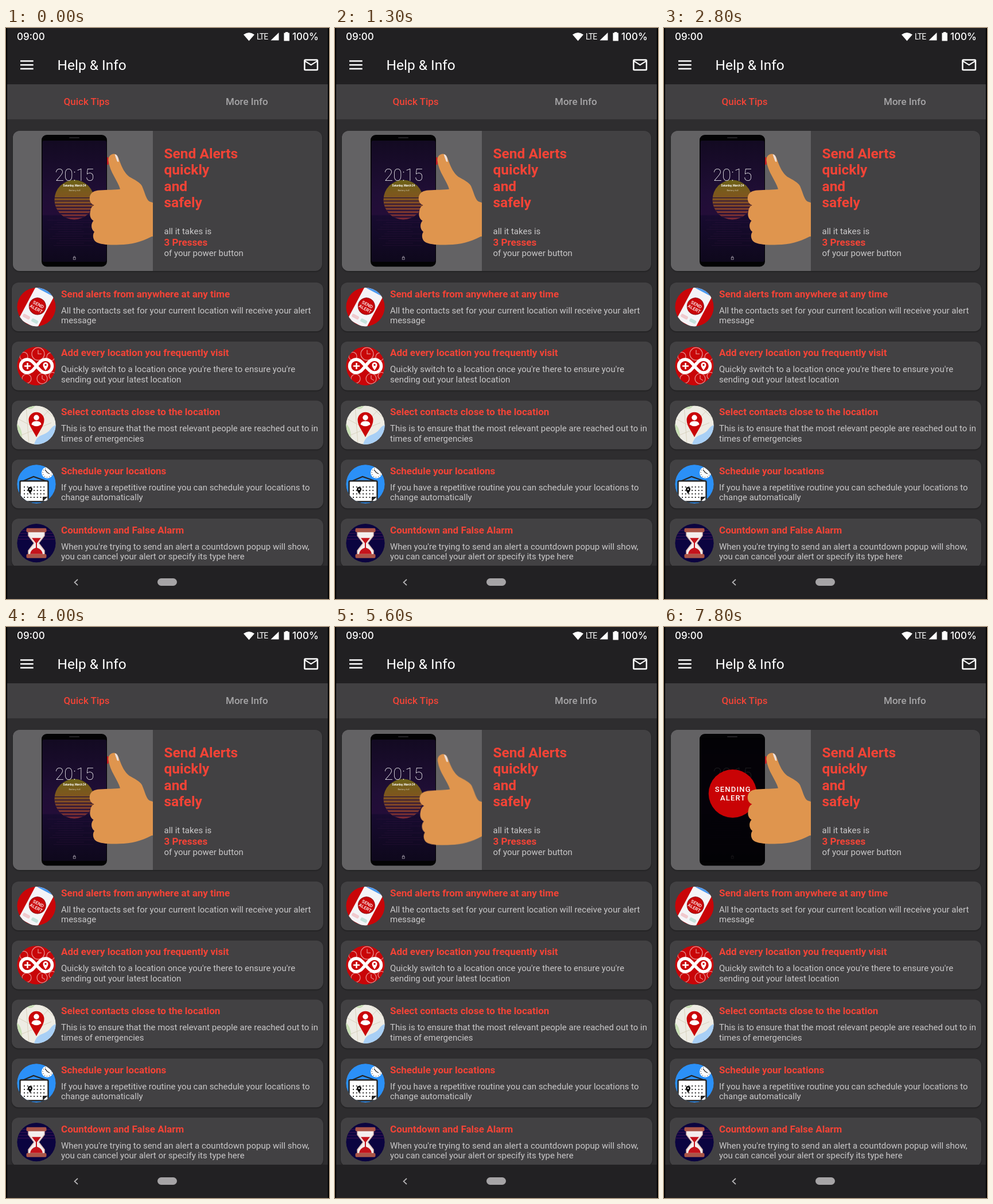
Animation of 563 by 994 pixels, one loop 8 s. Source, as an HTML page:

```html
<!DOCTYPE html>
<html lang="en">
<head>
<meta charset="utf-8">
<title>Help &amp; Info</title>
<style>
  html, body { margin: 0; width: 100%; height: 100%; overflow: hidden; background: #000; }
  svg { display: block; width: 563px; height: 994px; font-family: Roboto, sans-serif; }
  .title { font-size: 24.5px; fill: #fff; }
  .status { font: 500 17px Inter, sans-serif; fill: #fff; }
  .tab { font-size: 17px; font-weight: 500; }
  .lead { font-size: 24.5px; font-weight: 700; }
  .head { font-size: 17px; font-weight: 700; }
  .body { font-size: 15px; fill: #c9c8c9; }
  .red { fill: #f44336; }
  .card { fill: #424143; filter: drop-shadow(0 1.5px 1px #0006); }
  .clock { font-size: 28.8px; font-weight: 100; fill: #fff; }
  .sending { font-size: 13px; font-weight: 500; letter-spacing: 1.2px; fill: #fff; }
  .mid { text-anchor: middle; }

  .hand, .button, .alert { animation: 8s linear infinite; }
  .hand { animation-name: press; transform-origin: 256px 290px; }
  .button { animation-name: button; }
  .alert { animation-name: alert; opacity: 0; }
  @keyframes press {
    0%, 60% { transform: none; }
    62.5%, 85% { transform: translate(1.5px, 1px) rotate(-1deg); }
    87.5%, 100% { transform: none; }
  }
  @keyframes button {
    0%, 60% { opacity: 1; }
    62%, 85.5% { opacity: 0; }
    87.5%, 100% { opacity: 1; }
  }
  @keyframes alert {
    0%, 88.5% { opacity: 0; }
    92.5%, 100% { opacity: 1; }
  }
</style>
</head>
<body>
<svg viewBox="0 0 563 994">
  <defs>
    <clipPath id="round"><circle r="33.7"/></clipPath>
    <clipPath id="hero"><rect x="12" y="179" width="539" height="244" rx="12"/></clipPath>
    <clipPath id="panel"><rect x="12" y="179" width="244" height="244"/></clipPath>
    <clipPath id="sunClip"><circle cx="119" cy="299" r="34.5"/></clipPath>
    <linearGradient id="night" x2="0" y2="1">
      <stop stop-color="#130a22"/><stop offset=".45" stop-color="#200e36"/>
      <stop offset=".61" stop-color="#230d38"/><stop offset=".62" stop-color="#180b30"/>
      <stop offset="1" stop-color="#0e081c"/>
    </linearGradient>
    <linearGradient id="sun" x2="0" y2="1">
      <stop stop-color="#6c6217"/><stop offset=".45" stop-color="#80551f"/>
      <stop offset="1" stop-color="#7b2836"/>
    </linearGradient>
  </defs>

  <rect x="2" width="559" height="994" fill="#2e2d2f"/>
  <rect x="2" width="559" height="98" fill="#212022"/>
  <rect x="2" y="98" width="559" height="61" fill="#414042"/>

  <!-- Status and app bar -->
  <text class="status" x="19" y="21">09:00</text>
  <text class="status" x="499" y="21">100%</text>
  <text x="437" y="20" font-size="14" letter-spacing="-.9" fill="#fff">LTE</text>
  <g fill="#fff">
    <path d="M414 11.5Q423.5 4.5 433 11.5L423.5 22.5Z"/>
    <path d="M475.5 8V21.5H461.5Z"/>
    <path d="M484.5 8.5H487V7H491.5V8.500H494V22.5H484.5Z"/>
    <path d="M25 56.200h22.700v2.500h-22.700zM25 63h22.700v2.500h-22.700zM25 69.800h22.700v2.500h-22.700z"/>
    <path transform="translate(516.700 49.200) scale(1.25)" fill-rule="evenodd"
      d="M20 4H4Q2 4 2 6V18Q2 20 4 20H20Q22 20 22 18V6Q22 4 20 4ZM20 18H4V8L12 13L20 8ZM20 6L12 11L4 6Z"/>
  </g>
  <text class="title" x="89.500" y="73">Help &amp; Info</text>
  <text class="tab red" x="100.500" y="133.500">Quick Tips</text>
  <text class="tab" x="383" y="133.500" fill="#a5a4a6">More Info</text>

  <!-- Hero card -->
  <rect class="card" x="12" y="179" width="539" height="244" rx="12"/>
  <g clip-path="url(#hero)"><g clip-path="url(#panel)">
    <rect x="12" y="179" width="244" height="244" fill="#636264"/>
    <rect class="button" x="174" y="225" width="5" height="13" rx="1.5" fill="#c4202a"/>
    <rect x="62" y="186" width="114" height="229.500" rx="9" fill="#030304"/>
    <rect x="110" y="190" width="18" height="2" rx="1" fill="#242326"/>
    <rect x="63.500" y="196" width="111.500" height="211" rx="3" fill="url(#night)"/>
    <circle cx="119" cy="299" r="34.500" fill="url(#sun)"/>
    <g id="bands" clip-path="url(#sunClip)" fill="#27113a"></g>
    <g id="waves" fill="#4a1b50" opacity=".2"></g>
    <text class="clock mid" x="119.500" y="265.700">20:15</text>
    <text class="mid" x="119.500" y="276" font-size="4.600" font-weight="700" fill="#fff">Saturday, March 24</text>
    <text class="mid" x="119.500" y="283.500" font-size="4.200" fill="#d0c8b0">Battery full</text>
    <g fill="none" stroke="#aaa4b0" stroke-width=".8">
      <rect x="117.300" y="399.500" width="3.800" height="3.500"/>
      <path d="M118 399.500v-1.500q1.200-1.600 2.400 0v1.500"/>
    </g>
    <g class="alert">
      <rect x="63" y="193" width="112.500" height="216" rx="3" fill="#020203" opacity=".87"/>
      <circle cx="119.700" cy="290" r="42" fill="#c90305"/>
      <text class="sending mid" x="120.300" y="287">SENDING</text>
      <text class="sending mid" x="120.300" y="302">ALERT</text>
    </g>
    <g class="hand">
      <path fill="#df954e" d="M178.500 231C178 225 181 220 187 219.300C193 218.500 195 223 197.500 230
        C202 243 207 253 215 259C225 265 233 268 237 275C242 286 244 298 250 302L256 304L275 306V362L254 363
        C234 373 219 377 198 377.300C180 378 164 377 157 372.500C151 368 150.500 360 154 355
        C148 350 147.500 341 152.500 335.500C146.500 332 145.500 325 147 319C148 313 150 310 153.500 308.500
        C147 306 145 300 146 294C147.500 286 154 283 163 282.500C177 281.500 189 282 199 280.500
        C195 266 181 251 178.500 231Z"/>
      <path fill="#eadfdd" d="M189.500 220C193 219.500 196.500 225 196.500 233Q193.500 233.500 193 230Q191 225 189.500 220Z"/>
    </g>
  </g></g>
  <g class="lead red">
    <text x="275.500" y="227">Send Alerts</text>
    <text x="275.500" y="255">quickly</text>
    <text x="275.500" y="283.500">and</text>
    <text x="275.500" y="311.500">safely</text>
  </g>
  <text class="body" x="275.500" y="359">all it takes is</text>
  <text class="head red" x="275.500" y="378.700">3 Presses</text>
  <text class="body" x="275.500" y="397.300">of your power button</text>

  <g id="tips"></g>

  <!-- Tip icons, centred on 0,0 -->
  <g id="icons">
    <g>
      <circle r="34" fill="#c90508"/>
      <path d="M13-40H45V-10Z" fill="#3b8ee8"/>
      <g transform="rotate(28)">
        <rect x="-17.500" y="-36" width="36" height="69" rx="4" fill="#f4f4f7"/>
        <path d="M-14-36h29v6h-29z" fill="#4b9af0"/>
        <circle cx="1" cy="-2" r="14.500" fill="#c90508" stroke="#8c1218"/>
        <g class="mid" fill="#fff" font-size="8" font-weight="500">
          <text x="1" y="-2.500">SEND</text><text x="1" y="5.700">ALERT</text>
        </g>
        <rect x="-14" y="20" width="13" height="6" rx="2" fill="#f0c9cd"/>
        <rect x="3" y="20" width="12" height="6" rx="2" fill="#c4e2dc"/>
      </g>
    </g>
    <g>
      <circle r="34" fill="#c90508"/>
      <g fill="none" stroke="#e58b8b" stroke-width="1.300">
        <circle cx="3" cy="-21" r="11"/><path d="M3-28v7h6"/>
        <circle cx="-22" cy="-17" r="7"/><circle cx="25" cy="-16" r="7"/>
        <circle cx="-17" cy="22" r="8"/><circle cx="10" cy="22" r="9"/><path d="M10 16v6l5 3"/>
        <circle cx="28" cy="17" r="6"/>
      </g>
      <path d="M0 0C-6-7-10-11.500-16-11.500A11.500 11.500 0 0 0-16 11.500C-9 11.500-6 7 0 0S9-11.500 16-11.500A11.500 11.500 0 0 1 16 11.500C10 11.500 6 7 0 0Z"
        fill="#c90508" stroke="#fff" stroke-width="5.500"/>
      <path d="M-21 0h11M-15.500-5.500v11" stroke="#fff" stroke-width="2.600"/>
      <path d="M16 7.500C12 2 11.500 0 11.500-2a4.500 4.500 0 0 1 9 0C20.500 0 20 2 16 7.500Z" fill="#fff"/>
      <circle cx="16" cy="-2" r="1.700" fill="#c90508"/>
    </g>
    <g>
      <circle r="34" fill="#eeece4"/>
      <path d="M-34-2Q-23 5-25 34H-34ZM-22-34Q-10-22-2-34Z" fill="#c8dfb5"/>
      <path d="M34 0C24 3 26 10 15 15C6 19 0 20-4 34H34Z" fill="#a8cff5"/>
      <path d="M-34-12L-6 3L24-28M-18-34L-13 34M-32 20L26-4M8-34L34-10" fill="none" stroke="#d8d1bd"/>
      <path d="M0 21C-6 9-13.500 1-13.500-9a13.500 13.500 0 0 1 27 0C13.500 1 6 9 0 21Z" fill="#c90508"/>
      <circle cy="-13" r="4.700" fill="#fff"/>
      <path d="M-8.500-1Q-8-7 0-7T8.500-1Q4 2 0 2T-8.500-1Z" fill="#fff"/>
    </g>
    <g>
      <circle r="34" fill="#2b90f7"/>
      <circle cx="19" cy="-20" r="10" fill="#fff"/>
      <circle cx="19" cy="-20" r="8" fill="none" stroke="#333" stroke-width="1.500" stroke-dasharray=".8 3.390"/>
      <path d="M15-25L19-20L23-18" fill="none" stroke="#222" stroke-width="1.200"/>
      <path d="M-24-5L-5-13L18-5" fill="none" stroke="#252525" stroke-width="2.200"/>
      <rect x="-28.500" y="-5.500" width="49" height="36" rx="2" fill="#fff" stroke="#252525" stroke-width="2.400"/>
      <path d="M11 30V22H20Z" fill="#252525"/>
      <path d="M-22 5H15M-22 11H15M-22 17H15M-22 23H9" stroke="#333" stroke-width="2" stroke-dasharray="2 3.700"/>
      <path d="M-11 17C-15 11-15 10-15 9a4 4 0 0 1 8 0C-7 10-7 11-11 17Z" fill="#111"/>
      <circle cx="-11" cy="9" r="1.300" fill="#fff"/>
    </g>
    <g>
      <circle r="34" fill="#0b0440"/>
      <path d="M-34-22H34M-34-17H34M-34-12H34M-34-7H34" stroke="#2f0d4c" stroke-width="1.500"/>
      <path d="M-14-20V-13L-4 0L-14 13V20H14V13L4 0L14-13V-20Z" fill="#f4eeee" stroke="#d9b9b4" stroke-width="1.500" stroke-linejoin="round"/>
      <path d="M-8-9H8L1 0V8Q10 11 11 19H-11Q-10 11-1 8V0Z" fill="#c4131c"/>
      <rect x="-17.500" y="-26" width="35" height="7" rx="2" fill="#aa5548"/>
      <rect x="-17.500" y="19" width="35" height="7" rx="2" fill="#aa5548"/>
    </g>
  </g>

  <!-- Navigation bar -->
  <rect x="2" y="936" width="559" height="58" fill="#222123"/>
  <path d="M125 960L119.500 965L125 970" fill="none" stroke="#b5b4b6" stroke-width="1.700"/>
  <rect x="264" y="958" width="34" height="13" rx="6.500" fill="#a6a4a6"/>
  <path d="M0 0H2V994H0ZM561 0H563V994H561Z"/>
</svg>
<script>
  const tips = [
    ["Send alerts from anywhere at any time",
     "All the contacts set for your current location will receive your alert", "message"],
    ["Add every location you frequently visit",
     "Quickly switch to a location once you're there to ensure you're", "sending out your latest location"],
    ["Select contacts close to the location",
     "This is to ensure that the most relevant people are reached out to in", "times of emergencies"],
    ["Schedule your locations",
     "If you have a repetitive routine you can schedule your locations to", "change automatically"],
    ["Countdown and False Alarm",
     "When you're trying to send an alert a countdown popup will show,", "you can cancel your alert or specify its type here"]
  ];
  const byId = id => document.getElementById(id);
  const cardTop = i => 443 + i * 102.75;

  byId("tips").innerHTML = tips.map(([head, first, second], i) => `
    <g transform="translate(0 ${cardTop(i)})">
      <rect class="card" x="10" width="543" height="85" rx="12"/>
      <text class="head red" x="96" y="25.5">${head}</text>
      <text class="body" x="96" y="53.7">${first}</text>
      <text class="body" x="96" y="71">${second}</text>
    </g>`).join("");

  [...byId("icons").children].forEach((icon, i) => {
    icon.setAttribute("transform", `translate(53 ${cardTop(i) + 42.7})`);
    icon.setAttribute("clip-path", "url(#round)");
  });

  const stripes = (count, draw) => Array.from({ length: count }, (_, i) => draw(i)).join("");
  byId("bands").innerHTML = stripes(7, i =>
    `<rect x="84" y="${295 + i * 5.4}" width="70" height="${1.2 + i * 0.25}"/>`);
  byId("waves").innerHTML = stripes(12, i =>
    `<rect x="${72 + (i * 17) % 22}" y="${334 + i * 4}" width="${76 - (i * 13) % 34}" height="1"/>`);
</script>
</body>
</html>
```
